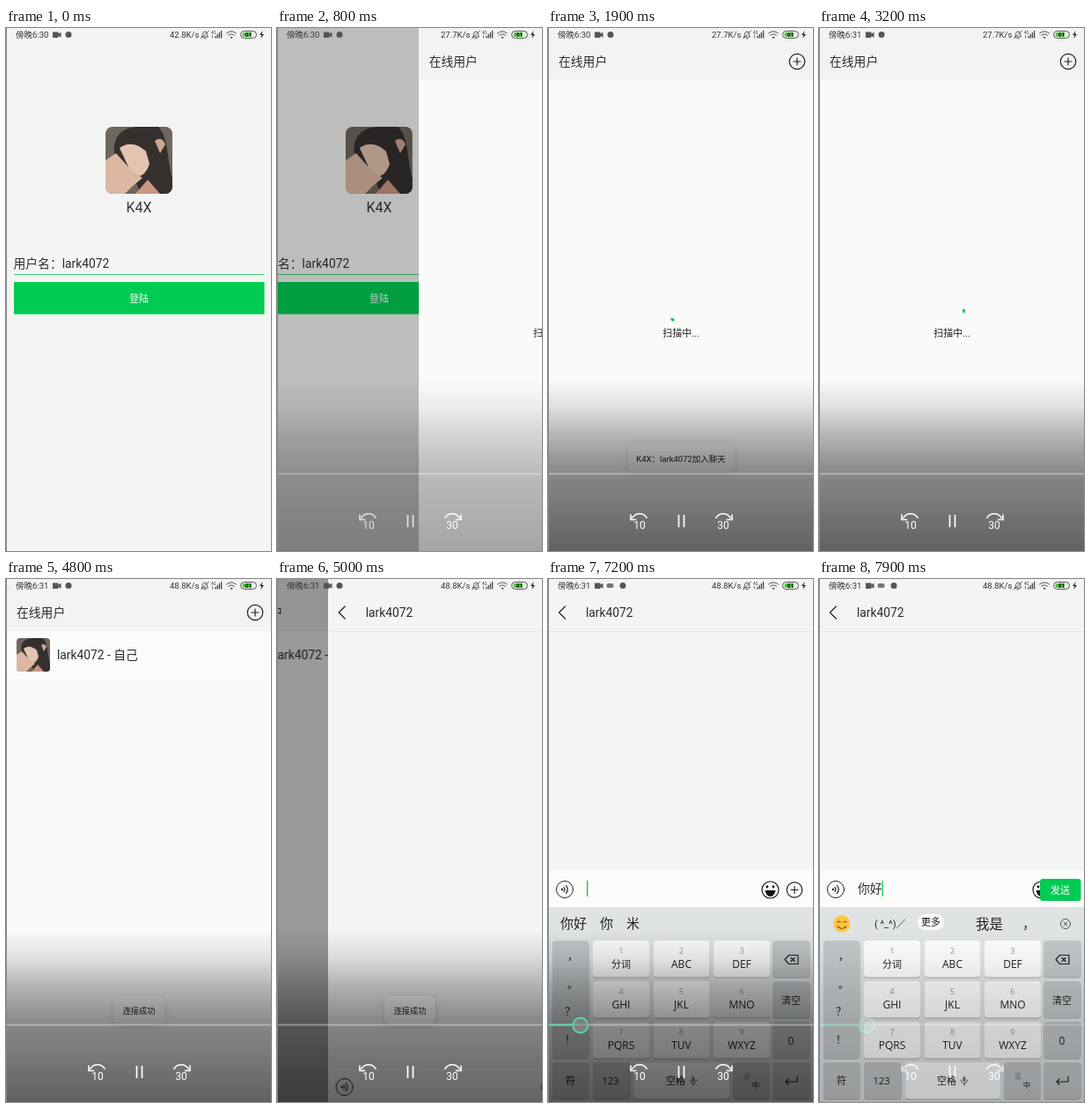
Animation of 301 by 593 pixels, one loop 8000 ms. Source, as an HTML page:

```html
<!DOCTYPE html>
<html lang="zh-CN">
<head>
<meta charset="utf-8">
<title>聊天演示</title>
<style>
html, body { margin: 0; width: 100%; height: 100%; overflow: hidden; background: #f3f5f2; }
svg { display: block; font-family: Roboto, "Noto Sans CJK SC", "Noto Sans CJK", sans-serif; }
.mid { text-anchor: middle; }
.line { fill: none; stroke: #222; stroke-width: 1.2; stroke-linecap: round; stroke-linejoin: round; }
.thin { stroke: #555; stroke-width: 1; }
.body { font-size: 13.8px; fill: #2c2c2c; }
.move { animation: 8s linear infinite; }
.slide { animation: 8s cubic-bezier(.2, .5, .2, 1) infinite; }
.login { animation-name: leave-login; }
.list-in { animation-name: enter-list; }
.list-out { animation-name: leave-list; }
.chat { animation-name: enter-chat; }
.dim-login { animation-name: dim-login; }
.dim-list { animation-name: dim-list; }
.rise { animation-name: rise; }
.knob { animation-name: seek; }
.played { animation-name: played; transform-origin: 0 0; }
.turn { animation-name: turn; transform-origin: 150.5px 320px; }
.arc { animation-name: arc; animation-timing-function: cubic-bezier(.4, 0, .2, 1); }

@keyframes leave-login { 0%, 9.1875% { transform: translateX(0); } 14.1875%, 100% { transform: translateX(-75px); } }
@keyframes enter-list { 0%, 9.1875% { transform: translateX(302px); } 14.1875%, 100% { transform: translateX(0); } }
@keyframes dim-login { 0%, 9.1875% { opacity: 0; } 14.1875%, 100% { opacity: .48; } }
@keyframes leave-list { 0%, 60.625% { transform: translateX(0); } 65.625%, 100% { transform: translateX(-75px); } }
@keyframes enter-chat { 0%, 60.625% { transform: translateX(302px); } 65.625%, 100% { transform: translateX(0); } }
@keyframes dim-list { 0%, 60.625% { opacity: 0; } 65.625%, 100% { opacity: .48; } }
@keyframes rise { 0%, 71% { transform: translateY(224px); } 75.5%, 100% { transform: translateY(0); } }
@keyframes seek { from { transform: translateX(-141px); } to { transform: translateX(56.5px); } }
@keyframes played { 0%, 71.4% { transform: scaleX(0); } 100% { transform: scaleX(56.5); } }
@keyframes turn { from { transform: rotate(98deg); } to { transform: rotate(2090deg); } }
@keyframes arc {
  0%, 6.67% { stroke-dasharray: 16 344; stroke-dashoffset: 0; }
  15% { stroke-dasharray: 270 90; stroke-dashoffset: 0; }
  23.34% { stroke-dasharray: 16 344; stroke-dashoffset: -270; }
  31.67% { stroke-dasharray: 270 90; stroke-dashoffset: -270; }
  40%, 100% { stroke-dasharray: 16 344; stroke-dashoffset: -540; }
}
</style>
</head>
<body>
<svg id="stage" width="301" height="593" viewBox="0 0 301 593">
  <defs>
    <linearGradient id="shade" x1="0" y1="0" x2="0" y2="1">
      <stop offset="0" stop-opacity="0"/>
      <stop offset=".16" stop-opacity=".1"/>
      <stop offset=".32" stop-opacity=".27"/>
      <stop offset=".55" stop-opacity=".46"/>
      <stop offset="1" stop-opacity=".61"/>
    </linearGradient>
    <filter id="soft" x="-20%" y="-50%" width="140%" height="200%">
      <feDropShadow dx="0" dy="2" stdDeviation="4" flood-opacity=".12"/>
    </filter>
    <clipPath id="round"><rect width="76" height="76" rx="8"/></clipPath>
    <g id="avatar" clip-path="url(#round)">
      <rect width="76" height="76" fill="#6f675d"/>
      <path d="M10 30C8 8 22 0 38 0H60C72 12 70 40 76 58V76H40L28 48Z" fill="#35302e"/>
      <path d="M16 24C26 16 38 20 46 28L50 42C46 54 38 60 30 54Z" fill="#e3c4b0"/>
      <path d="M0 38L12 30L30 50L42 58L30 68L22 76H0Z" fill="#dcb7a2"/>
      <path d="M56 16Q64 10 68 20L62 30Z" fill="#cfa591"/>
      <path d="M34 76L48 60L62 76Z" fill="#c99680"/>
    </g>
    <g id="plus" class="line"><circle r="8.7"/><path d="M-4 0H4M0-4V4"/></g>
    <g id="skip">
      <path d="M-8.5-4A9.5 9.5 0 0 1 8.5-4" fill="none" stroke="#fff" stroke-width="1.6"/>
      <path d="M-10-8.5V-2.5H-3.8" fill="none" stroke="#fff" stroke-width="1.6"/>
    </g>
  </defs>

  <g class="slide login">
    <rect width="301" height="593" fill="#f3f5f2"/>
    <use href="#avatar" x="113" y="112"/>
    <text x="151" y="209" font-size="16" class="mid" fill="#333">K4X</text>
    <text x="8.5" y="272" class="body">用户名：lark4072</text>
    <rect x="9" y="279" width="284.500" height="1" fill="#3fcb7c"/>
    <rect x="9" y="288" width="284.500" height="36.500" fill="#00cb53"/>
    <rect x="9" y="288" width="284.500" height="36.500" opacity=".07" data-show="400 490"/>
    <text x="151" y="310.500" font-size="11" class="mid" fill="#fff">登陆</text>
  </g>
  <rect class="slide dim-login" width="301" height="593"/>

  <g class="slide list-in">
    <g class="slide list-out">
      <rect width="301" height="593" fill="#f9fbf8"/>
      <rect width="301" height="59" fill="#f2f4f1"/>
      <text x="12" y="43" class="body">在线用户</text>
      <use href="#plus" x="283" y="38"/>
      <g data-show="0 3390">
        <g class="move turn">
          <circle class="move arc" cx="150.500" cy="320" r="14" pathLength="360" fill="none" stroke="#0fc25f" stroke-width="3"/>
        </g>
        <text x="151" y="350" font-size="11" class="mid" fill="#222">扫描中...</text>
      </g>
      <g data-show="3390 8000 150">
        <rect y="59" width="301" height="54" fill="#fafcf9"/>
        <rect y="59" width="301" height="54" fill="#e4e6e3" data-show="4400 4600 100 150"/>
        <use href="#avatar" transform="translate(12 67) scale(.5)"/>
        <text x="58" y="91" class="body">lark4072 - 自己</text>
      </g>
    </g>
  </g>
  <rect class="slide dim-list" width="301" height="593"/>

  <g class="slide chat">
    <rect width="301" height="593" fill="#f3f5f2"/>
    <rect y="59" width="301" height="1" fill="#e8eae7"/>
    <path class="line" d="M19.500 31L12.500 38L19.500 45"/>
    <text x="43" y="43" class="body">lark4072</text>
    <g class="slide rise">
      <rect y="330" width="301" height="43" fill="#fbfcfa"/>
      <g class="line">
        <circle cx="19" cy="352" r="9.500" stroke-width="1"/>
        <path d="M18 349.500Q20 352 18 354.500M20.500 347.500Q24 352 20.500 356.500"/>
        <circle cx="16" cy="352" r=".6"/>
        <circle cx="252.500" cy="352.500" r="9.500"/>
      </g>
      <path d="M246.500 353H258.500Q257 360 252.500 360T246.500 353Z" fill="#111"/>
      <circle cx="249" cy="349" r="1.400"/><circle cx="256" cy="349" r="1.400"/>
      <use href="#plus" x="280" y="352.500"/>
      <text x="44" y="356" class="body" data-show="7490 8000">你好</text>
      <rect x="44" y="342" width="1.300" height="18" fill="#00c853" data-show="6590 7490"/>
      <rect x="71.500" y="342" width="1.300" height="18" fill="#00c853" data-show="7490 8000"/>
      <g data-show="7490 8000 100">
        <rect x="251" y="340" width="46.500" height="25" rx="3" fill="#00cb53"/>
        <text x="274" y="356.500" font-size="11" class="mid" fill="#fff">发送</text>
      </g>
    </g>
  </g>

  <g class="slide rise">
    <rect y="372" width="301" height="230" fill="#dfe3e4"/>
    <g data-show="0 6640" class="line thin">
      <path d="M16 386h4v4h-4zM22.500 386h4v4h-4zM16 392.500h4v4h-4zM22.500 392.500h4v4h-4z"/>
      <path d="M53 387H65M53 390.500H65" stroke-dasharray="1.500 2.500" stroke-width="2"/><path d="M54 395H63" stroke-width="2"/>
      <circle cx="95" cy="390" r="4.500"/><path d="M98.500 393.500L101.500 396.500"/>
      <circle cx="133" cy="391" r="6"/><path d="M130 392.500Q133 396 136 392.500M131 389v.2M135 389v.2"/>
      <path d="M170.500 385V397M168.500 385h4M168.500 397h4M166.500 388.500L164 391L166.500 393.500M174.500 388.500L177 391L174.500 393.500"/>
      <rect x="205" y="384.500" width="5" height="9" rx="2.500"/><path d="M202 390Q202 396 207.500 396T213 390M207.500 396V398.500"/>
      <rect x="239" y="386" width="12" height="10" rx="1.500"/>
      <path d="M275 388.500L280.500 394L286 388.500"/>
      <text x="245" y="393.800" font-size="6.500" font-weight="700" class="mid" fill="#444" stroke="none">MV</text>
      <circle cx="253" cy="384.500" r="1.500" fill="#f0603a" stroke="none"/>
    </g>
    <g font-size="15" fill="#222">
      <text x="14" y="396" data-show="6640 7050">你　米　哦</text>
      <text x="14" y="396" data-show="7050 7490">你好　你　米</text>
      <g data-show="7490 8000">
        <circle cx="26" cy="391" r="9.500" fill="#fbc640"/>
        <path d="M20.500 389.500q2-2.500 4 0M27.500 389.500q2-2.500 4 0M21 393.500Q26 399.500 31 393.500" fill="none" stroke="#8a4b16" stroke-width="1.200"/>
        <text x="63" y="395" font-size="11">( ^_^)／</text>
        <rect x="112" y="380" width="30" height="18" rx="9" fill="#fafbfb"/>
        <text x="127" y="392.500" font-size="11" class="mid">更多</text>
        <text x="178" y="396.500" font-size="15.500">我是</text>
        <text x="231" y="396" font-size="15">，</text>
        <g class="line thin"><circle cx="280" cy="391" r="5.500"/><path d="M278 389l4 4M282 389l-4 4"/></g>
      </g>
    </g>
    <g id="keys" font-family="'Open Sans', 'Noto Sans CJK SC', sans-serif" fill="#222"></g>
  </g>

  <g data-show="850 2800 150 250">
    <rect x="91" y="471" width="121" height="33" rx="8" fill="#fafbf9" filter="url(#soft)"/>
    <text x="151" y="491.500" font-size="9.500" class="mid" fill="#222">K4X：lark4072加入聊天</text>
  </g>
  <g data-show="4050 5750 150 250">
    <rect x="122" y="473" width="58" height="32" rx="8" fill="#fafbf9" filter="url(#soft)"/>
    <text x="151" y="493" font-size="9.200" class="mid" fill="#222">连接成功</text>
  </g>

  <g fill="#333" font-size="9.500">
    <text x="11" y="11.200" data-show="0 1990">傍晚6:30</text>
    <text x="11" y="11.200" data-show="1990 8000">傍晚6:31</text>
    <path d="M53 4.500h6.500v2l3-1.800v6l-3-1.800v2H53z" fill="#555"/>
    <circle cx="71" cy="7.500" r="3.500" fill="#555" data-show="0 5740"/>
    <g fill="#777" data-show="5740 8000"><rect x="66.500" y="5" width="8" height="5" rx="2"/><circle cx="85" cy="7.500" r="3.500" fill="#555"/></g>
    <text x="186" y="11.200" data-show="0 95">42.8K/s</text>
    <text x="186" y="11.200" data-show="95 3890">27.7K/s</text>
    <text x="186" y="11.200" data-show="3890 8000">48.8K/s</text>
    <g class="line thin"><path d="M222.500 10H229.500Q228.500 9 228.500 6.500Q228 4 226 4T223.500 6.500Q223.500 9 222.500 10ZM225 11.800h2M221.500 12L230.500 3"/></g>
    <path d="M238 9v2.500M240.200 7v4.500M242.400 5v6.500M244.600 3v8.500" stroke="#444" stroke-width="1.300"/>
    <text x="233" y="6.500" font-size="4.500">4G</text><path d="M234.500 8v3.500" stroke="#777"/>
    <g class="line thin"><path d="M250.500 6Q256 1.500 261.500 6M252.500 8.300Q256 5.500 259.500 8.300"/><circle cx="256" cy="10.800" r=".8"/></g>
    <rect x="266.500" y="3.500" width="18" height="8" rx="4" fill="#eef0ed" stroke="#555"/>
    <path d="M271 5h8v5h-8q-2.500 0-2.500-2.500t2.500-2.500z" fill="#49c935"/>
    <text x="275.500" y="10" font-size="6.500" font-weight="700" class="mid" fill="#222">61</text>
    <path d="M291.500 3L288 8h2.200l-.7 4L293 7h-2.200z"/>
  </g>

  <g data-show="690 7730 200 270">
    <rect y="398" width="301" height="195" fill="url(#shade)"/>
    <rect y="504.500" width="301" height="2" fill="#fff" opacity=".36"/>
    <rect class="move played" y="504.500" width="1" height="2" fill="#5fd3a4"/>
    <circle class="move knob" cy="506" r="8.500" fill="#8a8f8c" fill-opacity=".6" stroke="#5fd3a4" stroke-width="2"/>
    <use href="#skip" transform="translate(104 560)"/>
    <use href="#skip" transform="translate(199 560) scale(-1 1)"/>
    <path d="M148.500 552V566M154.500 552V566" stroke="#fff" stroke-width="1.700"/>
    <g font-size="12" class="mid" fill="#fff"><text x="104" y="567.500">10</text><text x="199" y="567.500">30</text></g>
  </g>
  <rect width="1" height="593" fill="#858785"/>
</svg>
<script>
const LOOP = 8000;
const keys = document.getElementById('keys');
const LIGHT = '#fbfcfc', DARK = '#c1c6c9';
const COLS = [51, 119.5, 188], ROWS = [410, 456, 502, 548];

const box = (x, y, w, h, fill) =>
  `<rect x="${x}" y="${y + 1}" width="${w}" height="${h}" rx="4" fill="#a9aeb1"/>` +
  `<rect x="${x}" y="${y}" width="${w}" height="${h}" rx="4" fill="${fill}"/>`;
const label = (x, y, text, size = 11, fill = '#222') =>
  `<text x="${x}" y="${y}" font-size="${size}" fill="${fill}" class="mid">${text}</text>`;
const press = (col, row, at) =>
  `<rect x="${COLS[col]}" y="${ROWS[row]}" width="64" height="41.5" rx="4" opacity=".12" data-show="${at} ${at + 90}"/>`;

const parts = [box(5, 410, 41.5, 133.5, DARK)];
['，', '。', '？', '！'].forEach((mark, i) =>
  parts.push(label(i < 2 ? 28 : 25, 432 + i * 31.5, mark, 12)));
['分词', 'ABC', 'DEF', 'GHI', 'JKL', 'MNO', 'PQRS', 'TUV', 'WXYZ'].forEach((name, i) => {
  const x = COLS[i % 3], y = ROWS[Math.floor(i / 3)];
  parts.push(box(x, y, 64, 41.5, LIGHT), label(x + 32, y + 15, i + 1, 9.5, '#999'),
    label(x + 32, y + 30.5, name, i ? 12 : 11));
});
ROWS.forEach(y => parts.push(box(255, y, 42.5, 41.5, DARK)));
parts.push(
  box(5, 548, 41.5, 41.5, DARK), box(51, 548, 42.5, 41.5, DARK),
  box(98, 548, 108, 41.5, LIGHT), box(210, 548, 42, 41.5, DARK),
  label(276, 482, '清空'), label(276, 527.5, '0', 12), label(25.5, 573, '符'),
  label(71, 573, '123'), label(145, 573, '空格'),
  label(226, 567, '英', 7.5, '#777'), label(236, 577, '中', 8.5),
  '<g class="line"><path d="M269 431.500L273.500 426.500H284V436.500H273.500ZM276 429.500l4 4M280 429.500l-4 4M283 564V570H270M273 567L270 570L273 573"/></g>',
  '<rect x="163.500" y="564" width="3" height="6" rx="1.500" fill="#777"/><path class="line thin" d="M161.500 568Q162 572 165 572T168.500 568M165 572v2"/>',
  press(2, 1, 6590), press(0, 1, 6740), press(0, 1, 6890), press(1, 0, 7040), press(2, 1, 7190));
keys.innerHTML = parts.join('');

// data-show: start, end, fade-in and fade-out in ms
const rules = [...document.querySelectorAll('[data-show]')].map((el, i) => {
  const [start, end, fadeIn = 1, fadeOut = 1] = el.dataset.show.split(' ').map(Number);
  const peak = el.getAttribute('opacity') || 1;
  const first = start ? 0 : 1, last = end < LOOP ? 0 : 1;
  const points = [[0, first], [start, first], [start + fadeIn, 1], [end, 1], [end + fadeOut, 0], [LOOP, last]];
  const frames = points.filter(([t]) => t <= LOOP)
    .map(([t, level]) => `${t / LOOP * 100}%{opacity:${level * peak}}`).join('');
  el.style.animation = `show${i} ${LOOP}ms linear infinite`;
  return `@keyframes show${i}{${frames}}`;
});
document.head.append(Object.assign(document.createElement('style'), { textContent: rules.join('\n') }));
</script>
</body>
</html>
```
